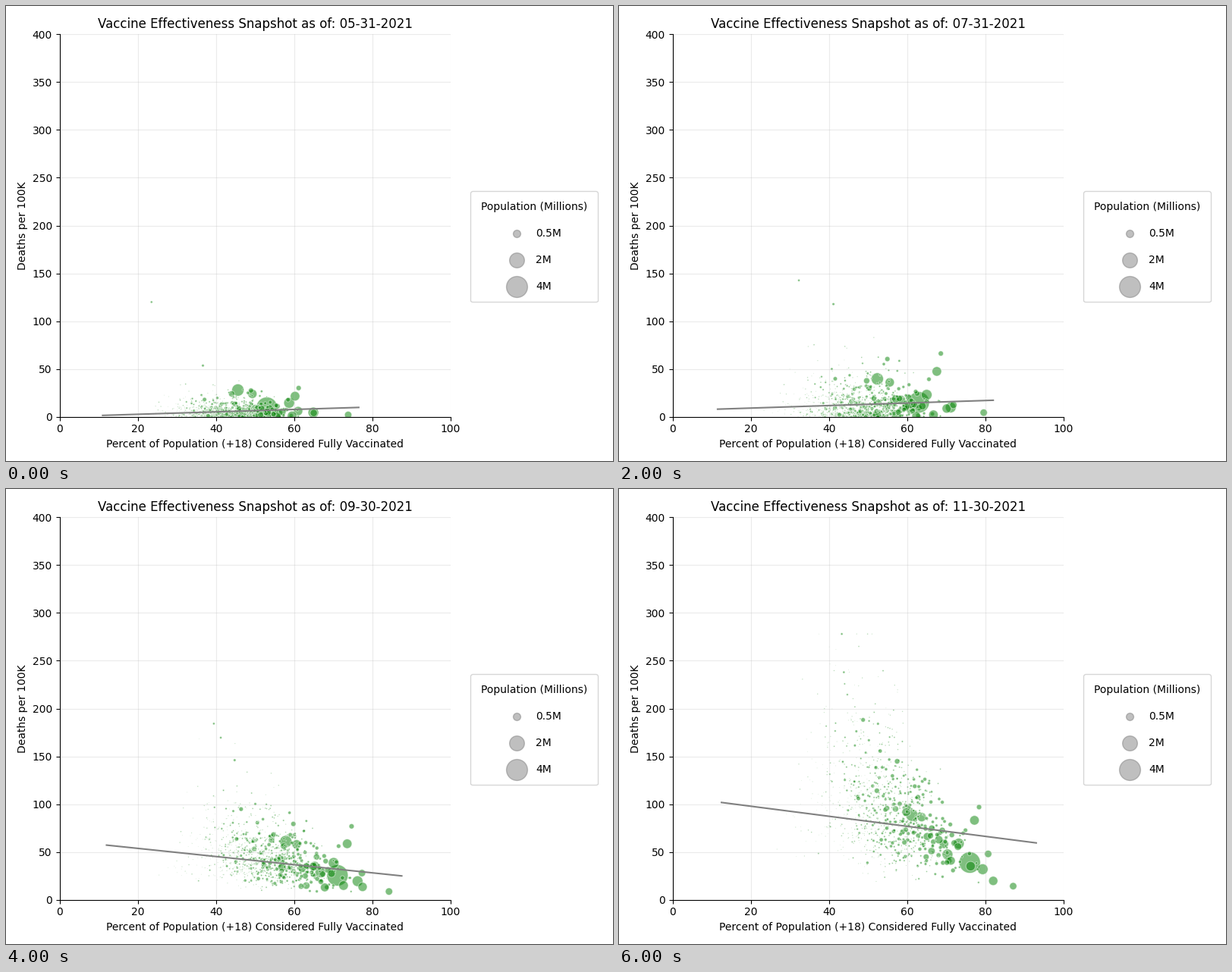
A matplotlib script that plays this animation: 800 px wide and 600 px high, repeating every 7 s.

```python
import numpy as np
import matplotlib.pyplot as plt
from matplotlib.animation import FuncAnimation

DATES = ["05-31", "06-30", "07-31", "08-31", "09-30", "10-31", "11-30"]
LAST = len(DATES) - 1

# Heights of the fitted line's ends at a few months, linear in between
KEY_MONTHS = [0, 2, 3, 4, 6]
LEFT_KEYS = [1.5, 8, 26.8, 57.2, 101.8]
RIGHT_KEYS = [9.8, 17.3, 17, 25, 59.5]

# Leading counties: diameter in pixels, first x and y, last x and y
LEADERS = np.array([
    [28, 53, 9.5, 76, 39],
    [16, 45.6, 28, 61.2, 88.5],
    [14, 58.7, 14.5, 73.2, 58.8],
    [12, 49.3, 24, 63.7, 86.5],
    [14, 64.9, 4.5, 79.3, 32],
    [12, 61, 6, 82, 19.8],
    [14, 53.5, 6, 70.3, 47.5],
    [12, 50, 8, 69.4, 58.5],
    [9.5, 73.8, 2, 87.1, 14.3],
    [9.5, 65, 4, 80.7, 48],
    [8, 44, 24, 57, 95],
    [3, 23.5, 120, 43.8, 238],
])


def vaccinated(month):
    """Share of the way from first to last x: fast at first, then slower."""
    return 1 - (1 - month / LAST) ** 1.4


def leaders(month):
    _, x0, y0, x1, y1 = LEADERS.T
    x = x0 + (x1 - x0) * vaccinated(month)
    y = y0 + (y1 - y0) * (month / LAST) ** 1.5
    return x, y


# The other counties: larger ones sit further right and scatter less
rng = np.random.default_rng(8)
COUNT = 1000
log_size = rng.normal(0, 1.35, COUNT)
small_sizes = np.clip(1.5 * np.exp(log_size), 0.2, 80)
last_x = np.clip(54 + 7 * rng.normal(size=COUNT) + 4 * log_size, 17, 83)
early = rng.gamma(1, 6, COUNT)
shape = 4 + 0.6 * small_sizes
late = (np.clip(97 - 2.4 * (last_x - 50), 12, 105)
        * rng.gamma(shape, 1 / shape))
pace = rng.uniform(0.9, 1.8, COUNT)


def small_counties(month):
    x = last_x * (0.78 + 0.22 * vaccinated(month))
    surge = (max(month - 2, 0) / (LAST - 2)) ** pace
    y = early * (1 + 0.6 * min(month, 2)) + late * surge
    return x, np.minimum(y, 278)


def fitted_line(month):
    xs = [11 + 0.25 * month, 76.5 + 2.75 * month]
    ys = [np.interp(month, KEY_MONTHS, keys) for keys in (LEFT_KEYS, RIGHT_KEYS)]
    return xs, ys


fig, ax = plt.subplots(figsize=(8, 6), dpi=100)
ax.set(xlim=(0, 100), ylim=(0, 400),
       xlabel="Percent of Population (+18) Considered Fully Vaccinated",
       ylabel="Deaths per 100K")
ax.grid(alpha=0.25)
ax.spines[["top", "right"]].set_visible(False)

sizes = np.concatenate([(0.72 * LEADERS[:, 0]) ** 2, small_sizes])
dots = ax.scatter(np.zeros_like(sizes), np.zeros_like(sizes), s=sizes,
                  c="green", alpha=0.5, edgecolors="white", linewidths=0.7)
line, = ax.plot([], [], color="gray", lw=1.5)
title = ax.set_title("")

for millions in (0.5, 2, 4):
    ax.scatter([], [], s=100 * millions, c="gray", alpha=0.5,
               label=f"{millions}M")
ax.legend(title="Population (Millions)", loc="lower left",
          bbox_to_anchor=(1.05, 0.3), borderaxespad=0, borderpad=1,
          labelspacing=1.5, scatterpoints=1)


def update(month):
    places = np.hstack([leaders(month), small_counties(month)])
    dots.set_offsets(places.T)
    line.set_data(*fitted_line(month))
    title.set_text(f"Vaccine Effectiveness Snapshot as of: {DATES[month]}-2021")
    return dots, line, title


update(0)
fig.tight_layout()
anim = FuncAnimation(fig, update, frames=len(DATES), interval=1000,
                     repeat=True, repeat_delay=0)
plt.show()
```
